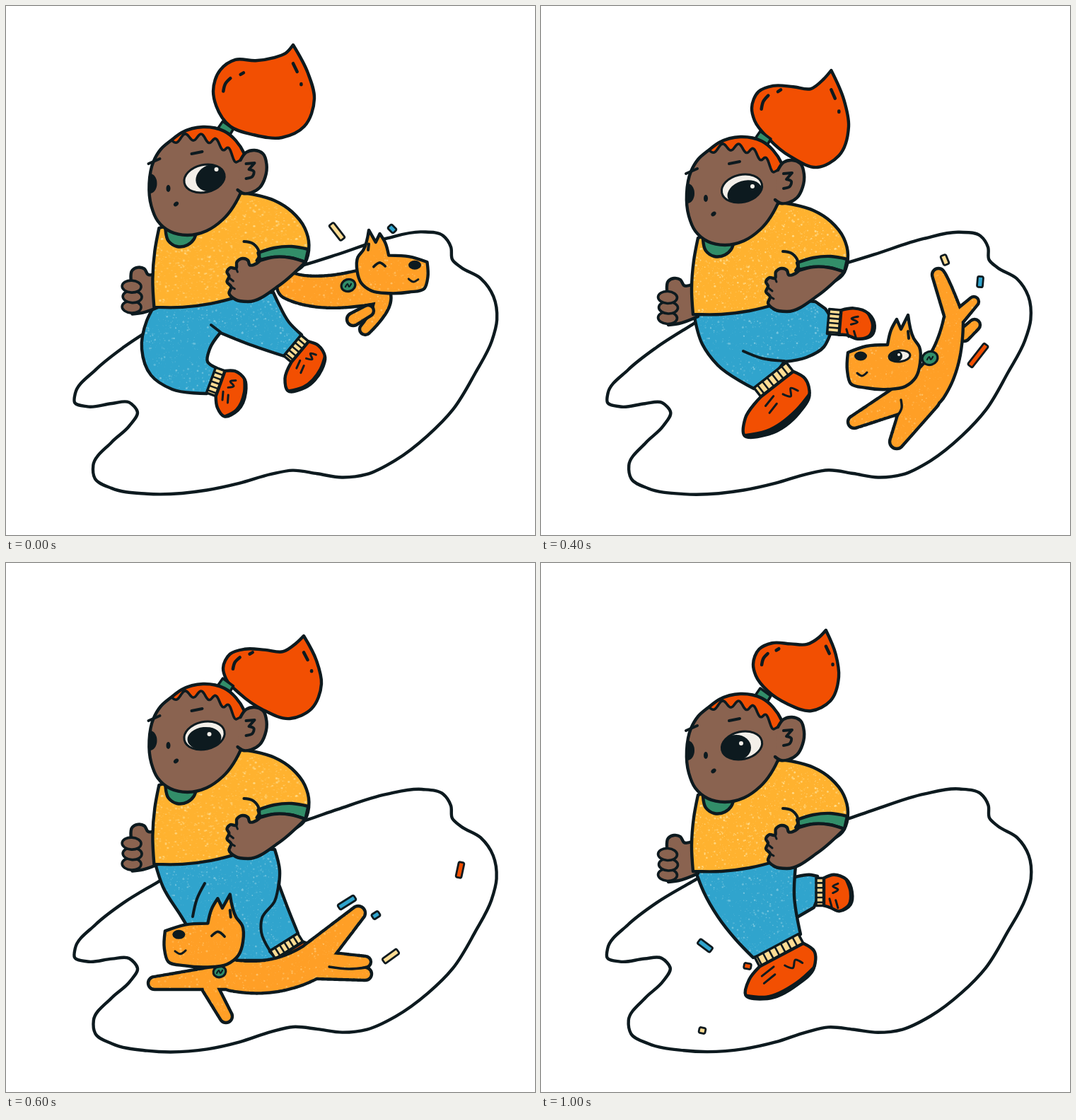
Write an HTML page with a canvas that moves like this. It is 748 px wide and 748 px high and loops after 1.2 s.

```html
<!DOCTYPE html>
<html lang="en">
<head>
<meta charset="utf-8">
<title>Run with the dog</title>
<style>
html, body { margin: 0; width: 100%; height: 100%; overflow: hidden; background: #fff; }
canvas { display: block; width: 748px; height: 748px; }
</style>
</head>
<body>
<canvas id="stage" width="748" height="748"></canvas>
<script>
const ctx = document.getElementById('stage').getContext('2d');
const INK = '#0d1a1f', SKIN = '#8a6350', RED = '#f24f02', SHIRT = '#ffb22f', BLUE = '#30a4cd',
  GREEN = '#328e69', CREAM = '#ffdc93', DOG = '#ff9f26', WHITE = '#fff', EYE = '#f3efe9';
const TAU = Math.PI * 2, rad = deg => deg * TAU / 360;

// Printed grain: a tile of seeded specks
let seed = 7;
const rnd = () => (seed = seed * 16807 % 2147483647) / 2147483647;
function grain(color, count) {
  const c = document.createElement('canvas');
  c.width = c.height = 190;
  const g = c.getContext('2d');
  g.fillStyle = color;
  for (let i = 0; i < count; i++) {
    g.globalAlpha = 0.25 + rnd() * 0.5;
    g.beginPath();
    g.arc(rnd() * 190, rnd() * 190, 0.4 + rnd() ** 4 * 1.2, 0, TAU);
    g.fill();
  }
  return ctx.createPattern(c, 'repeat');
}
const GRAIN = { [SHIRT]: grain('#ffe9a8', 1900), [BLUE]: grain('#8fd0e4', 1500), [DOG]: grain('#ffcb78', 1300) };

// Points are written "x,y"; "!" marks a sharp corner
const parse = text => text.trim().split(/\s+/).map(s => {
  const [x, y] = s.replace('!', '').split(',').map(Number);
  return { x, y, sharp: s.endsWith('!') };
});
const warp = (text, f) => parse(text).map(p => f(p.x, p.y).join() + (p.sharp ? '!' : '')).join(' ');

// Smooth curve that leans on the shorter neighbour at each point
function curve(text, closed) {
  const p = parse(text), n = p.length, path = new Path2D();
  const at = i => p[(i + n) % n];
  const dist = (a, b) => Math.hypot(b.x - a.x, b.y - a.y) || 1;
  const tangent = i => {
    const a = at(i - 1), b = at(i), c = at(i + 1);
    if (b.sharp || (!closed && (i === 0 || i === n - 1))) return [0, 0];
    const l = dist(a, b), m = dist(b, c), s = l + m;
    return ['x', 'y'].map(k => (b[k] - a[k]) / l * m / s + (c[k] - b[k]) / m * l / s);
  };
  path.moveTo(p[0].x, p[0].y);
  for (let i = 0; i < (closed ? n : n - 1); i++) {
    const a = at(i), b = at(i + 1), d = dist(a, b) / 3;
    const t = tangent(i), u = tangent((i + 1) % n);
    path.bezierCurveTo(a.x + t[0] * d, a.y + t[1] * d, b.x - u[0] * d, b.y - u[1] * d, b.x, b.y);
  }
  if (closed) path.closePath();
  return path;
}
function ink(path, w) {
  ctx.strokeStyle = INK;
  ctx.lineWidth = w;
  ctx.stroke(path);
}
function fill(color, path) {
  for (const style of [color, GRAIN[color]]) {
    if (!style) continue;
    ctx.fillStyle = style;
    ctx.fill(path);
  }
}
function shape(color, text, w = 4.4) {
  const path = curve(text, true);
  fill(color, path);
  if (w) ink(path, w);
  return path;
}
function lines(list, w = 3.4, f = (x, y) => [x, y]) {
  if (list) list.split('/').forEach(s => ink(curve(warp(s, f)), w));
}
function oval(color, x, y, rx, ry = rx, turn = 0, w = 0) {
  const path = new Path2D();
  path.ellipse(x, y, rx, ry, turn, 0, TAU);
  fill(color, path);
  if (w) ink(path, w);
  return path;
}
function shifted(x, y, draw) {
  ctx.save();
  ctx.translate(x, y);
  draw();
  ctx.restore();
}
function inside(path, draw) {
  ctx.save();
  ctx.clip(path);
  draw();
  ctx.restore();
}

// Puddle outline, wavering a little from pose to pose
const PUDDLE = '300,400 430,363 470,350 540,328 590,320 620,326 631,342 633,360 645,371 673,387 690,412 694,445 686,475 662,520 630,572 595,608 550,642 510,661 475,665 440,660 405,656 375,662 330,676 285,686 200,690 150,681 126,667 123,648 148,616 173,593 184,574 172,560 148,561 113,565 95,559 96,546 125,513 165,482 215,451';
const puddle = i => shape(WHITE, warp(PUDDLE, (x, y) =>
  [x + 2 * Math.sin(i * 2 + y / 70), y + 1.5 * Math.sin(i * 3 + x / 60)]));

// Ponytail in the box x, y, w, h; sag drops the tail off its root
function ponytail([x, y, w, h, tip, sag]) {
  const fit = (u, v) => [x + u * w, y + v * h], dip = k => 0.22 + (tip - 0.22) * k;
  shape(RED, warp(`${tip},0! ${tip / 2 + 0.54},.3 1,.58 .9,.88 .68,1 .4,${0.97 - 0.08 * sag}
    .17,${0.88 - 0.18 * sag} .03,${0.66 - 0.14 * sag} 0,${0.5 - 0.11 * sag} .07,${0.27 - 0.05 * sag}
    .22,.16 ${dip(0.35)},.17 ${dip(0.65)},${0.14 + 0.05 * sag} ${dip(0.87)},.09`, fit));
  const lift = 0.1 * sag;
  lines(`.1,${0.5 - lift} .12,${0.42 - lift} .17,${0.36 - lift}/.27,${0.32 - lift} .3,${0.3 - lift}/
    ${tip},.2 ${tip + 0.04},.29/${tip + 0.08},.42 ${tip + 0.08},.43`, 4.5, fit);
}

// Sock and shoe below a trouser end at x, y, pointing along deg
function foot([x, y, deg, w, len, toe, deep, sole = 0.07]) {
  const c = Math.cos(rad(deg)), s = Math.sin(rad(deg));
  const onLeg = (a, d) => [x - a * w * s + d * c, y + a * w * c + d * s];
  const onShoe = (a, d) => onLeg(a, len + d * deep * w);
  shape(CREAM, warp(`-.5,0! .5,0! .5,${len}! -.5,${len}!`, onLeg), 3.5);
  for (let a = -0.5; a < 0.5; a += 1 / (w / 18 + 3.5)) lines(`${a},0 ${a},${len}`, 2.6, onLeg);
  shape(RED, warp(`-.5,0! -.62,.35 -.45,.8 0,1 ${toe * 0.65},.95 ${toe},.55 ${toe * 0.8},.2 .5,0!`, onShoe));
  shape(INK, warp(`-.5,.75! 0,1 ${toe * 0.65},.95 ${toe},.55! ${toe * 0.65},${0.95 - sole} 0,${1 - sole}`, onShoe), 3);
  if (sole < 0.3) lines('.25,.2 .55,.28/.3,.42 .58,.5/-.3,.5 -.2,.32 -.08,.5 .04,.32', 3, onShoe);
}

// Dog limbs and trunk: tapering tubes merged under one outline
function tubes(...parts) {
  for (const [color, grow] of [[INK, 2.2], [DOG, -2.2]]) {
    const path = new Path2D();
    for (const [text, r0, r1] of parts) {
      const p = parse(text), steps = 60;
      for (let i = 0; i <= steps; i++) {
        const k = i / steps, j = 1 - k, [a, m] = p, b = p[2] || m;
        const bend = p[2] ? q => 2 * m[q] - (a[q] + b[q]) / 2 : q => (a[q] + b[q]) / 2;
        const [x, y] = ['x', 'y'].map(q => j * j * a[q] + 2 * j * k * bend(q) + k * k * b[q]);
        const r = r0 * j + r1 * k + grow;
        path.moveTo(x + r, y);
        path.arc(x, y, r, 0, TAU);
      }
    }
    fill(color, path);
  }
}
function tag(x, y, r = 9) {
  oval(GREEN, x, y, r, r * 0.85, -0.3, 3.2);
  lines(`${x - 4},${y + 2} ${x - 1},${y - 2} ${x + 1},${y + 2} ${x + 4},${y - 2}`, 2.2);
}
// Dog head looking left; a negative sx turns it right
function dogHead(x, y, sx, sy, eye) {
  const f = (u, v) => [x + u * sx, y + v * sy];
  shape(DOG, warp('-51,-20! -25,-29 5,-31! 10,-52 18,-67! 24,-53! 34,-73! 42,-40 50,-28 51,-5 45,15 30,28 5,32 -25,30 -47,24 -52,5', f));
  oval(INK, ...f(-33, -15), 9, 6.5);
  lines('-38,9 -31,13 -24,8', 3, f);
  lines('34,-50 35,-40', 4, f);
  const [ex, ey] = f(22, -15);
  if (eye === 'shut') lines('10,-13 18,-19 27,-12', 3.6, f);
  else if (eye === 'dot') oval(INK, ex + 5, ey, 3.2, 5);
  else {
    oval(EYE, ex, ey, 15, 8, -0.1, 3);
    oval(INK, ex - 5, ey, 9, 8);
    oval(EYE, ex - 1, ey - 2, 2);
  }
}

// bob: body height; pupil and shine sit in head space
const poses = [
  {
    bob: -14, pupil: [293, 257, 22, 18, -0.5], shine: [301, 245],
    pony: [293, 55, 143, 131, 0.79, 0],
    pants: '209,425! 300,405 378,405! 385,420 400,447 418,465! 393,495! 340,477 303,462! 288,485 285,503 298,512! 284,548! 235,542 205,522 192,485 199,445',
    crease: '290,451 303,461',
    feet: [[405, 480, 40, 38, 14, 1.4, 1.05], [290, 529, 20, 38, 14, 1.1, 1]],
    dog() {
      tubes(['402,396 450,404 515,396', 19, 26], ['528,405 530,425 508,457', 14, 8]);
      tubes(['512,431 491,443', 8, 9]);
      tag(484, 395, 10);
      dogHead(546, 379, -0.97, 0.85, 'shut');
    },
    chips: 'c468,319,27,52 b546,315,11,45'
  },
  {
    bob: -4, pupil: [291, 261, 21, 14, -0.4], shine: [303, 251],
    pony: [293, 65, 140, 138, 0.6, 0.1],
    pants: '216,433! 300,420 375,424! 398,439 426,427! 452,448! 425,478 395,497 360,507 330,504 307,498! 302,525 297,555! 265,561 237,563! 233,520 225,480',
    crease: '290,488 307,498',
    feet: [[435, 442, -50, 32, 15, 0.9, 1.2], [267, 559, 84, 59, 24, 0.95, 0.78]],
    dog() {
      tubes(['537,357 546,378 556,408', 7, 17], ['552,415 527,434', 14, 8],
        ['560,415 590,424 612,440', 18, 23], ['580,478 544,513', 13, 9], ['626,445 612,485 588,534', 11, 10]);
      tag(632, 428, 7);
      dogHead(588, 458, 0.72, 0.83, 'dot');
    },
    chips: 'c444,296,14,52 b535,302,10,45 b519,370,21,54 r582,382,13,20'
  },
  {
    bob: 0, pupil: [288, 264, 25, 17, -0.3], shine: [299, 255],
    pony: [298, 91, 137, 137, 0.82, 1],
    pants: '216,434! 300,415 388,418! 402,428! 411,445 409,464! 400,482 375,497 344,503! 325,526 301,541! 250,508 228,478',
    crease: '286,488 312,498 344,502',
    feet: [[406, 446, 5, 35, 17, 0.6, 1.4], [324, 522, 52, 58, 16, 1.4, 0.88, 0.12]],
    dog() {
      tubes(['598,465 613,451', 9, 8]);
      tubes(['562,380 570,400 584,440', 9, 13], ['612,418 590,440', 7, 10], ['583,445 570,500 545,540', 14, 28],
        ['540,550 503,616', 26, 10], ['515,553 443,588', 20, 9]);
      lines('509,557 510,568 502,582');
      tag(550, 498, 11);
      dogHead(485, 510, 1, 1, 'open');
    },
    chips: 'c571,359,14,68 b621,390,15,95 r618,494,38,-52'
  },
  {
    bob: -14, pupil: [284, 262, 24, 16, -0.1], shine: [291, 256],
    pony: [307, 103, 139, 117, 0.82, 1],
    pants: '211,425! 300,405 380,405! 387,435 386,455! 400,492 413,524! 373,549! 385,562! 285,562! 248,500 222,458',
    crease: '386,450 380,478 362,502 361,522 373,548/281,453 270,475 264,500',
    feet: [[393, 536, 58, 46, 14, 1, 0.6]],
    dog() {
      tubes(['320,583 380,583 435,562', 22, 25], ['435,558 498,495', 22, 10], ['435,568 508,564', 20, 8],
        ['440,570 508,581', 18, 9], ['315,585 210,594', 18, 9], ['288,600 311,641', 11, 9]);
      lines('457,571 485,574 509,572');
      tag(302, 578);
      dogHead(280, 540, 1.08, 0.98, 'shut');
    },
    chips: 'r642,434,22,102 b482,480,27,-32 b523,498,11,-32 c544,556,25,-36'
  },
  {
    bob: 0, pupil: [276, 262, 22, 18, 0], shine: [283, 257],
    pony: [304, 101, 133, 125, 0.83, 1],
    back: '350,425! 388,420! 400,443 419,460! 410,490 398,512! 355,511!',
    pants: '218,434! 300,420 386,420! 368,460 360,495 337,585 322,622! 290,613 257,605! 256,560 262,520 268,490! 250,478 232,460',
    crease: '272,470 267,492',
    feet: [[408, 485, 27, 53, 15, 0.85, 0.62], [290, 613, 110, 67, 11, 0.8, 0.55, 0.55]],
    dog() {
      tubes(['222,486 225,468', 6, 5]);
      tubes(['198,458 187,490', 24, 27], ['187,490 192,527', 27, 12], ['185,525 156,557', 13, 10],
        ['190,522 193,577', 14, 10], ['198,524 250,506 288,494', 14, 8]);
    },
    chips: 'c575,533,13,-38 r448,603,30,-16 b489,593,12,-16 r261,566,27,3 c193,643,22,32'
  },
  {
    bob: 0, pupil: [276, 261, 21, 18, 0], shine: [283, 255],
    pony: [300, 95, 121, 114, 0.85, 0.7],
    back: '350,447! 382,441 391,443! 393,465 386,487! 350,508!',
    pants: '218,434! 300,420 360,428! 358,470 367,525! 335,546 300,558! 275,532 250,500 230,465',
    feet: [[389, 465, 0, 39, 11, 0.7, 1.02], [333, 541, 62, 70, 15, 1.02, 0.68]],
    dog() {},
    chips: 'b232,541,22,37 r292,570,10,10 c228,661,9,12'
  }
];

function legs(p) {
  if (p.back) shape(BLUE, p.back);
  shape(BLUE, p.pants);
  lines(p.crease, 4);
  p.feet.forEach(foot);
}

function leftFist() {
  shape(SKIN, '222,390! 202,395 197,387 188,385 180,389 178,402! 180,451! 195,449 222,439!');
  for (let i = 2; i >= 0; i--) oval(SKIN, 179 + i % 2, 412 + i * 14.5, 13.5, 8.5, 0.05, 3.6);
}

function torso(drop) {
  shape(SHIRT, `222,328! 216,360 213,400 215,${436 + drop}! 255,${436 + drop} 295,${431 + drop} 335,${421 + drop}! 390,400 428,378 434,352 428,328 410,305 385,289 358,281 338,278! 300,300`);
  shape(GREEN, '362,363! 385,356 410,354 433,358! 429,376! 408,370 385,369 365,373!');
  shape(SKIN, '365,374! 385,369 408,370 429,376! 392,409 348,432 330,429 321,420 324,411 318,404 321,396 318,390 323,384 331,385 332,376 340,371 348,374 350,380 360,378');
  lines('342,347 353,349 362,358 364,366 360,374', 4);
  lines('322,399 327,403/324,411 329,414/331,385 333,390', 3);
}

// Wavy fringe: half-waves along an arc across the crown
function fringe() {
  let edge = '';
  for (let i = 0; i <= 40; i++) {
    const k = i / 40, j = 1 - k, wave = 5 * Math.sin(k * TAU * 4.5);
    edge += `${j * j * 238 + 2 * j * k * 296 + k * k * 331},${j * j * 204 + 2 * j * k * 186 + k * k * 234 + wave} `;
  }
  return edge;
}

function face(p) {
  const head = curve('212,234 222,217 237,204 252,193 282,185 312,191 340,222 346,245 338,272 310,316 287,332 260,338 236,333 218,318 209,297 206,265', true);
  fill(SKIN, head);
  inside(head, () => {
    oval(INK, 207, 265, 10, 14);
    shape(RED, fringe() + '350,225! 350,170! 230,170!', 3.6);
  });
  ink(head, 4.4);
  const ear = curve('335,232 343,221 355,218 367,223 372,238 370,256 362,271 350,278 339,279 331,274');
  fill(SKIN, ear);
  ink(ear, 4.4);
  lines('343,237 355,236! 347,245! 354,248 352,255 343,258/205,237 221,230/266,223 281,220', 4);
  oval(INK, 233, 272, 3, 5);
  oval(INK, 244, 294, 4, 2.8, -0.7);
  const eye = oval(EYE, 284, 258, 29, 19.5, -0.22);
  inside(eye, () => oval(INK, ...p.pupil));
  ink(eye, 3);
  oval(EYE, ...p.shine, 3);
}

const PAPER = { c: CREAM, b: BLUE, r: RED };
function confetti(text) {
  for (const s of text.split(' ')) {
    const [x, y, len, deg] = s.slice(1).split(',').map(Number);
    shifted(x, y, () => {
      ctx.rotate(rad(deg));
      const path = new Path2D();
      path.roundRect(-len / 2, -4, len, 8, 2);
      ctx.fillStyle = PAPER[s[0]];
      ctx.fill(path);
      ink(path, 2.8);
    });
  }
}

function draw(i) {
  const p = poses[i], up = p.bob;
  ctx.fillStyle = WHITE;
  ctx.fillRect(0, 0, 748, 748);
  ctx.lineJoin = ctx.lineCap = 'round';
  puddle(i);
  legs(p);
  p.dog();
  shifted(up * 0.1, up * 1.1, leftFist);
  shifted(up * 0.4, up, () => torso(-up * 0.28));
  const onHead = f => shifted(up * 0.25, up, f);
  onHead(() => shape(GREEN, '229,330! 233,346 245,354 260,352 269,344 273,332!'));
  ponytail(p.pony);
  onHead(() => {
    shape(GREEN, '301,190! 310,177! 325,188! 319,198!', 3.5);
    face(p);
  });
  confetti(p.chips);
}

const HOLD = 200, start = performance.now();
let shown = -1;
function tick() {
  const i = Math.floor((performance.now() - start) / HOLD) % poses.length;
  if (i !== shown) draw(shown = i);
  requestAnimationFrame(tick);
}
tick();
</script>
</body>
</html>
```
